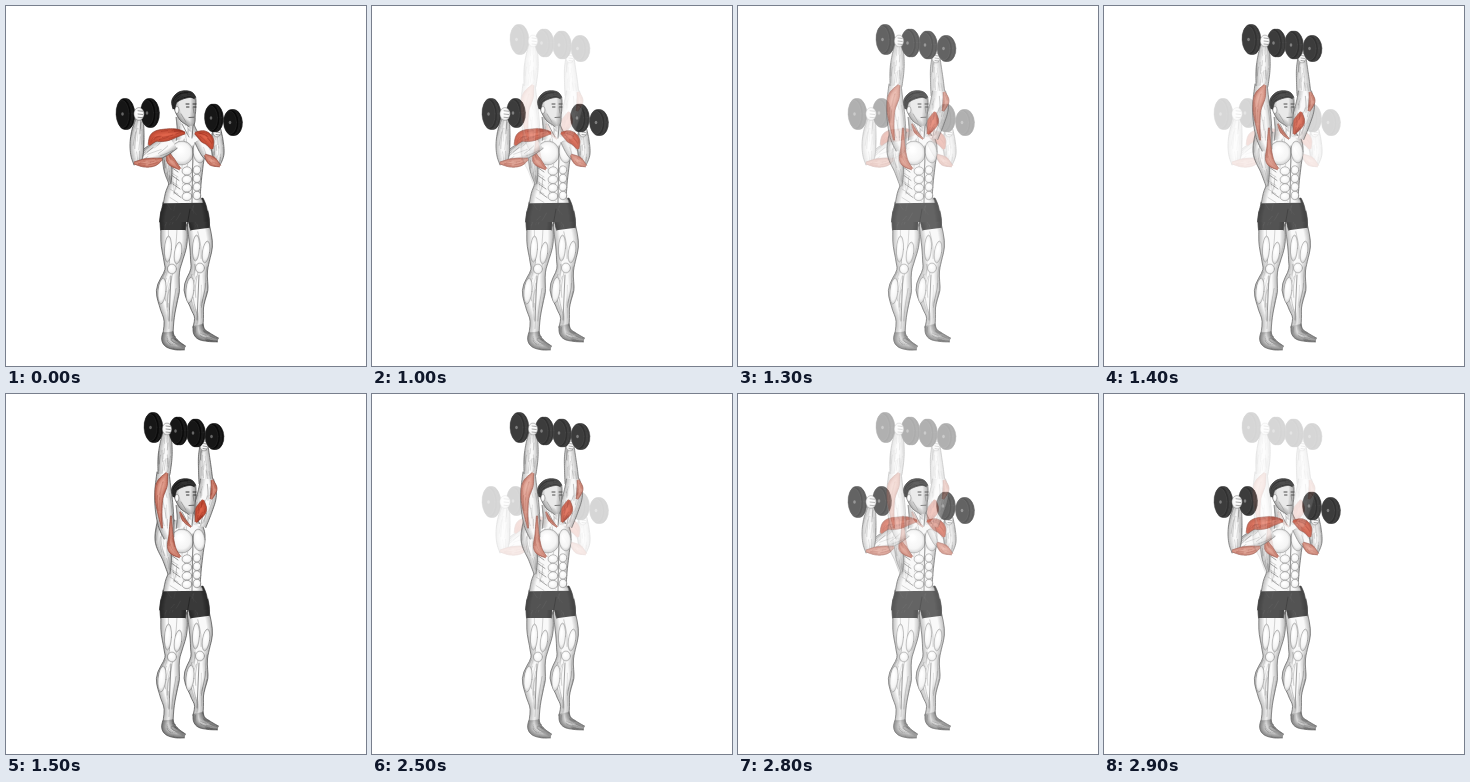
These frames come from a looping animation (360 px wide and 360 px high, 3000 ms). An HTML page with a canvas:

```html
<!DOCTYPE html>
<html lang="en">
<head>
<meta charset="utf-8">
<title>Dumbbell shoulder press</title>
<style>
html, body { margin: 0; width: 100%; height: 100%; overflow: hidden; background: #fff; }
canvas { display: block; width: 360px; height: 360px; }
</style>
</head>
<body>
<canvas id="stage"></canvas>
<script>
const SIZE = 360, LOOP = 3000, STEP = 100, TAU = Math.PI * 2;
const scale = Math.max(1, window.devicePixelRatio || 1);
const stage = document.getElementById('stage');
stage.width = stage.height = SIZE * scale;
const view = stage.getContext('2d');
let g, seed;

function random() {
  seed = (seed * 16807) % 2147483647;
  return seed / 2147483647;
}

const SKIN = { fill: '#f9f9f9', edge: '#4a4a4a', shade: 'rgba(50,50,50,.07)', fibre: 'rgba(50,50,50,.38)', n: 16 };
const FOOT = { ...SKIN, fill: '#d0d0d0', shade: 'rgba(30,30,30,.12)', n: 14 };
const FACE = { ...SKIN, fill: '#e6e6e6', shade: 'rgba(30,30,30,.08)', n: 0 };
const HAIR = { ...SKIN, fill: '#353535', edge: '#222', fibre: 'rgba(0,0,0,.5)' };
const CLOTH = { fill: '#393939', edge: '#2b2b2b', shade: 'rgba(0,0,0,.07)', fibre: 'rgba(130,130,130,.2)', n: 8 };
const RED = { fill: '#e0644b', edge: '#8f4a3e', shade: 'rgba(150,40,25,.1)', fibre: 'rgba(130,30,20,.5)', n: 14 };
const PALE = { ...RED, fill: '#efb3a3', fibre: 'rgba(150,60,45,.5)', n: 10 };

// Catmull-Rom through key points [x, y, half width], t from 0 to 1
function sample(keys, t) {
  const s = t * (keys.length - 1), i = Math.min(keys.length - 2, Math.floor(s)), f = s - i;
  const key = j => keys[Math.max(0, Math.min(keys.length - 1, j))];
  return key(i).map((b, k) => {
    const a = key(i - 1)[k], c = key(i + 1)[k], d = key(i + 2)[k];
    return b + f / 2 * (c - a + f * (2 * a - 5 * b + 4 * c - d + f * (3 * (b - c) + d - a)));
  });
}

// Point at t along a limb and u across it (-1 to 1)
function spot(keys, t, u) {
  const [x, y, w] = sample(keys, t);
  const p = sample(keys, Math.max(0, t - 0.01)), q = sample(keys, Math.min(1, t + 0.01));
  const dx = q[0] - p[0], dy = q[1] - p[1], len = Math.hypot(dx, dy) || 1;
  return [x - dy / len * w * u, y + dx / len * w * u];
}

// Tapered form with soft inner shading and seeded fibres
function limb(look, ...keys) {
  const N = 24;
  g.save();
  g.beginPath();
  for (let i = 0; i <= N; i++) g.lineTo(...spot(keys, i / N, 1));
  for (let i = N; i >= 0; i--) g.lineTo(...spot(keys, i / N, -1));
  g.closePath();
  g.fillStyle = look.fill;
  g.fill();
  const edge = new Path2D();
  for (const u of [1, -1]) for (let i = 0; i <= N; i++) edge[i ? 'lineTo' : 'moveTo'](...spot(keys, i / N, u));
  g.clip();
  g.strokeStyle = look.shade;
  for (let w = 2; w <= 10; w += 2) {
    g.lineWidth = w;
    g.stroke(edge);
  }
  g.strokeStyle = look.fibre;
  for (let i = 0; i < look.n; i++) {
    const u = random() * 1.9 - 0.95, t = random() * 0.75, span = 0.12 + random() * 0.25, drift = (random() - 0.5) * 0.5;
    g.lineWidth = 0.3 + random() * 0.4;
    g.beginPath();
    for (let k = 0; k <= 6; k++) g.lineTo(...spot(keys, Math.min(1, t + span * k / 6), u + drift * k / 6));
    g.stroke();
  }
  g.restore();
  g.strokeStyle = look.edge;
  g.lineWidth = 0.7;
  g.stroke(edge);
}

function muscle(x, y, rx, ry, tilt = 0) {
  g.save();
  g.translate(x, y);
  g.rotate(tilt);
  g.scale(rx, ry);
  const glow = g.createRadialGradient(-0.2, -0.3, 0.2, 0, 0, 1);
  glow.addColorStop(0, '#fff');
  glow.addColorStop(0.7, '#f4f4f4');
  glow.addColorStop(1, '#c9c9c9');
  g.beginPath();
  g.arc(0, 0, 1, 0, TAU);
  g.fillStyle = glow;
  g.fill();
  g.restore();
  g.strokeStyle = 'rgba(60,60,60,.6)';
  g.lineWidth = 0.5;
  g.stroke();
}

function dash(x, y, dx, dy, width = 0.8, color = '#333') {
  g.strokeStyle = color;
  g.lineWidth = width;
  g.beginPath();
  g.moveTo(x, y);
  g.lineTo(x + dx, y + dy);
  g.stroke();
}

function legs() {
  limb(SKIN, [192, 218, 11], [195, 238, 11.5], [194, 254, 9.5], [193, 265, 8.5], [190, 283, 12], [191, 300, 7], [193, 311, 4.5], [192, 322, 5]);
  limb(SKIN, [168, 218, 13], [168, 238, 13], [167, 256, 9], [166, 266, 7.5], [162, 284, 11.5], [162, 300, 8.5], [163, 314, 5], [162, 328, 5]);
  for (const [x, y] of [[166, 263], [194, 262]]) {
    muscle(x + 6, y - 16, 3.6, 11, 0.15);
    muscle(x - 4, y - 20, 3.5, 13, 0.05);
    muscle(x, y, 4.5, 5);
    muscle(x - 10, y + 22, 4, 13, 0.1);
    dash(x - 1, y + 7, -2, 45, 0.7, '#666');
  }
  limb(FOOT, [162, 326, 5], [163, 334, 7], [170, 339, 5], [179, 342, 2]);
  limb(FOOT, [192, 319, 5], [194, 327, 6], [202, 331, 4.5], [212, 334, 2]);

  limb(CLOTH, [192, 206, 10], [193, 215, 10.5], [194, 223, 9.5]);
  limb(CLOTH, [167, 206, 12], [167, 215, 13], [167, 224, 12.5]);
  limb(CLOTH, [177, 194, 20], [178, 204, 23], [178, 216, 24.5]);
  dash(184, 203, -3, 17, 0.8, '#222');
}

function torso() {
  limb(SKIN, [181, 126, 13], [181, 140, 18], [180, 160, 17], [179, 178, 16], [177, 190, 18], [177, 197, 20]);
  muscle(176, 147, 11.5, 12, 0.1);
  muscle(193, 146, 6, 11, -0.1);
  for (let row = 0; row < 4; row++) {
    const y = 165 + row * 8.5;
    muscle(181, y, 5, 4.2, -0.1);
    muscle(191, y - 1, 3.8, 4.2, 0.1);
    dash(165 + row, y - 4, 7, 5, 0.6, '#555');
    dash(164, y + 1, 8, 5, 0.4, '#888');
  }
  dash(187, 140, -1, 57, 0.7, '#555');
}

function head() {
  limb(SKIN, [178, 110, 8], [180, 122, 9], [182, 132, 12]);
  dash(187, 120, -1, 12, 0.7, '#555');
  dash(176, 118, 7, 13, 0.6, '#555');
  limb(FACE, [179, 86, 6], [179, 91, 10.5], [179, 100, 11], [181, 109, 9], [184, 116, 5.5], [185, 120, 2.5]);
  limb(HAIR, [168, 103, 1], [168.5, 95, 2.8], [175, 89.5, 4], [184, 88.5, 3], [189, 92, 1]);
  muscle(171, 104, 2, 3.6);
  for (const x of [180, 187]) {
    dash(x, 98, 3, 0, 1);
    dash(x + 0.5, 101, 2.5, 0, 1);
  }
  dash(187, 101, 1, 6, 0.6, '#666');
  dash(183, 111.5, 5, -0.3, 0.9, '#555');
  dash(175, 108, 5, 8, 0.7, '#888');
}

// Discs from the far side to the near side
function plates(x, y, ry) {
  for (let i = 0; i < 5; i++) {
    const r = i % 4 ? 1 : 0.88;
    g.beginPath();
    g.ellipse(x + 3 - i * 1.5, y, 7.4 * r, ry * r, -0.04, 0, TAU);
    g.fillStyle = i % 2 ? '#090909' : '#161616';
    g.fill();
    g.strokeStyle = '#333';
    g.lineWidth = 0.4;
    g.stroke();
  }
  g.beginPath();
  g.ellipse(x - 3, y, 1.3, 1.8, 0, 0, TAU);
  g.fillStyle = '#666';
  g.fill();
}

function dumbbell(x, y, dx, dy, ry) {
  dash(x, y, dx, dy, 4, '#777');
  plates(x + dx, y + dy, ry - 1);
  plates(x, y, ry);
}

function fist(x, y, r) {
  muscle(x, y, r * 0.8, r);
  for (let i = -1; i < 2; i++) dash(x - 1, y + i * r / 2, r * 0.7, 0.5, 0.6, '#555');
}

function lowered() {
  legs();
  torso();
  limb(SKIN, [160, 148, 4], [162, 164, 4], [164, 178, 1]);
  limb(PALE, [162, 146, 1], [165, 155, 4], [174, 163, 1]);

  limb(SKIN, [166, 135, 9], [156, 142, 9], [143, 149, 8], [132, 155, 4]);
  limb(SKIN, [134, 112, 3.5], [132, 124, 6], [131, 138, 7], [131, 150, 6], [131, 159, 3]);
  limb(PALE, [128, 157, 1], [138, 157, 4], [148, 156, 4], [156, 153, 1]);
  limb(SKIN, [196, 133, 8], [203, 146, 8], [210, 156, 5]);
  limb(SKIN, [211, 122, 3.5], [211, 134, 6], [212, 148, 6], [211, 159, 3]);
  limb(PALE, [199, 149, 1], [206, 155, 4.5], [214, 160, 1]);

  head();
  limb(RED, [143, 139, 1], [149, 131, 5], [160, 129, 6], [171, 127, 4], [179, 127, 1]);
  limb(RED, [189, 127, 1], [197, 130, 5.5], [203, 135, 5], [206, 143, 1]);
  fist(211, 126, 5);
  dumbbell(119.5, 108, 24.5, -1, 15.5);
  dumbbell(208, 112, 19, 4.5, 14);
  fist(133, 108, 6.5);
}

function raised() {
  legs();
  torso();
  limb(SKIN, [198, 48, 3.5], [198, 62, 5.5], [199, 76, 6.5], [200, 89, 7]);
  limb(SKIN, [201, 85, 6.5], [201, 100, 9.5], [197, 115, 9.5], [193, 132, 7]);
  limb(PALE, [206, 86, 1], [208, 95, 3], [205, 105, 1]);

  limb(SKIN, [160, 125, 8], [157, 146, 8], [161, 165, 4.5], [163, 180, 1]);
  limb(SKIN, [157, 78, 6], [157, 95, 8], [158, 112, 9], [160, 130, 8], [163, 144, 5]);
  limb(SKIN, [161, 36, 3.5], [160, 50, 6], [159, 64, 7], [158, 80, 6]);
  limb(PALE, [161, 79, 1], [156, 90, 5.5], [153, 104, 4], [154, 120, 2], [156, 134, 0.5]);
  limb(PALE, [165, 122, 0.5], [165, 140, 2], [166, 155, 4], [174, 163, 1]);

  head();
  limb(RED, [197, 106, 1], [195, 116, 5.5], [190, 128, 1]);
  limb(PALE, [174, 118, 0.5], [178, 126, 1.5], [185, 133, 0.5]);
  fist(198, 52, 5);
  dumbbell(190, 39, 18.5, 3.5, 14);
  dumbbell(147.5, 33.5, 25, 3.5, 15);
  fist(161, 35, 6);
}

function layer(draw) {
  const c = document.createElement('canvas');
  c.width = c.height = SIZE * scale;
  g = c.getContext('2d');
  g.scale(scale, scale);
  g.lineJoin = g.lineCap = 'round';
  seed = 77;
  draw();
  return c;
}

const low = layer(lowered), high = layer(raised);

// Share of the raised pose, in sixths
function lift(t) {
  const stepped = from => Math.min(1, Math.max(0, Math.floor((t - from) / STEP) + 1) / 6);
  return stepped(1000) - stepped(2500);
}

function put(pose, alpha) {
  view.globalAlpha = alpha;
  view.drawImage(pose, 0, 0);
}

const start = performance.now();
function frame() {
  const w = lift((performance.now() - start) % LOOP);
  view.globalAlpha = 1;
  view.fillStyle = '#fff';
  view.fillRect(0, 0, stage.width, stage.height);
  put(low, 1 - w);
  put(high, w);
  requestAnimationFrame(frame);
}
frame();
</script>
</body>
</html>
```
